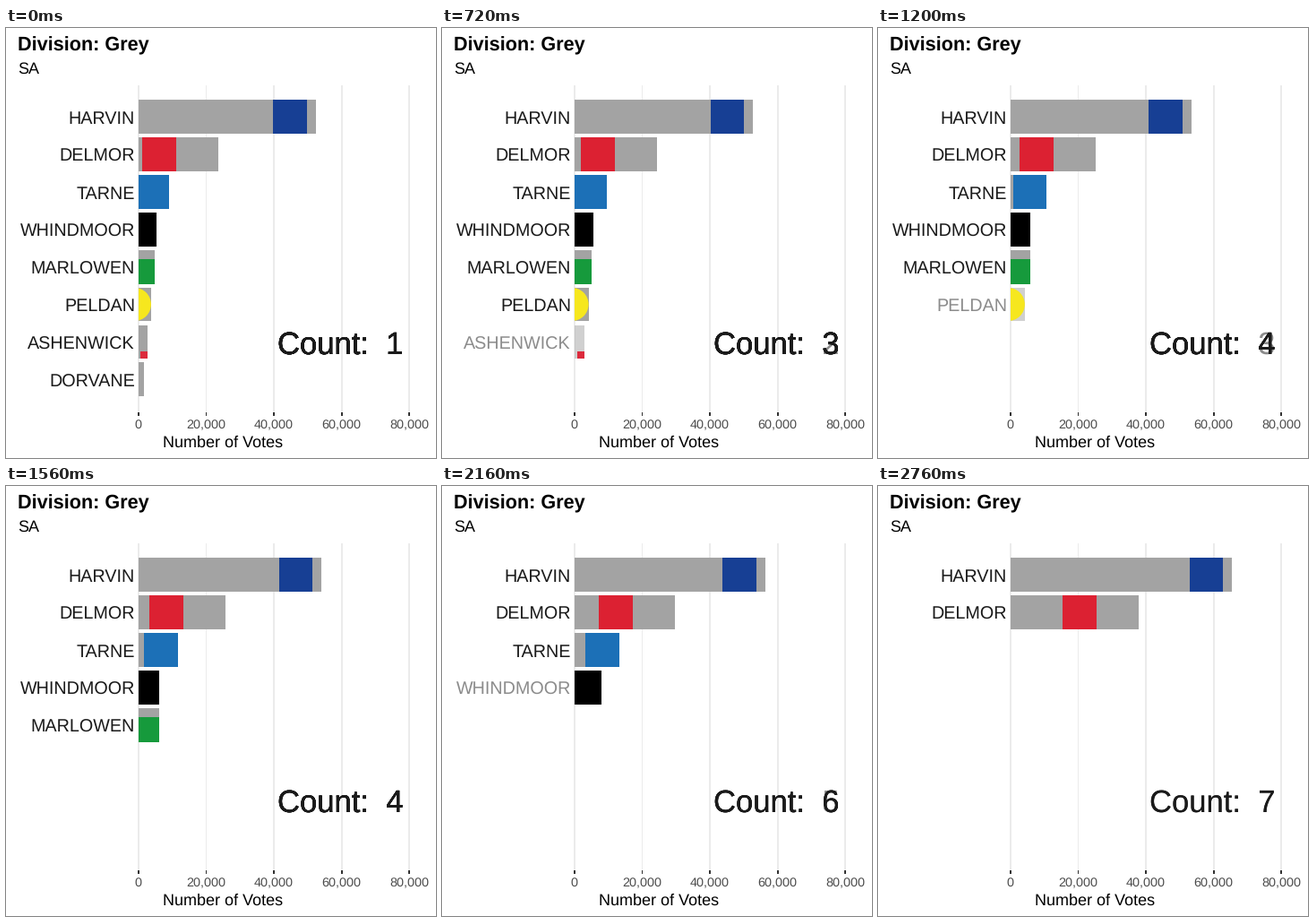
These frames come from a looping animation (480x480 px, 3 s). A matplotlib script:

```python
import matplotlib.pyplot as plt
from matplotlib.animation import FuncAnimation
from matplotlib.patches import Circle, Rectangle

plt.rcParams["font.family"] = "Liberation Sans"
plt.rcParams["text.hinting"] = "none"

SIZE, DPI = 480, 100
FRAMES, INTERVAL = 25, 120
X0, PX_PER_K = 147.8, 3.78          # zero line, pixels per thousand votes
TOP, BOTTOM = 64, 428.5             # panel edges
ROW0, ROW_STEP, BAR_H = 99, 41.9, 37.8
INK, BAR = "#1a1a1a", "#a3a3a3"

# Thousands of votes at each count, until the candidate drops out.
VOTES = {
    "HARVIN": [52.4, 52.5, 52.9, 54.0, 55.35, 57.3, 65.4],
    "DELMOR": [23.6, 23.9, 24.75, 25.65, 27.9, 31.4, 37.95],
    "TARNE": [9.05, 9.15, 9.9, 11.6, 12.5, 14.0],
    "WHINDMOOR": [5.35, 5.5, 5.65, 6.1, 7.9],
    "MARLOWEN": [4.75, 4.85, 5.55, 6.1],
    "PELDAN": [3.75, 4.1, 4.25],
    "ASHENWICK": [2.65, 2.85],
    "DORVANE": [1.65],
}

# Badge per candidate: shape, colour, size, offset of its centre from the bar end.
BADGES = {
    "HARVIN": ("square", "#173f94", 37.8, -28.5, 0),
    "DELMOR": ("square", "#dc2132", 37.8, -66, 0),
    "TARNE": ("square", "#1c70b7", 37.8, -18.9, 0),
    "WHINDMOOR": ("square", "#000000", 37.8, -18.9, 0),
    "MARLOWEN": ("square", "#169a3c", 28, -14, 4.9),
    "PELDAN": ("circle", "#f6e71e", 37, -18.5, 0),
    "ASHENWICK": ("square", "#dc2a3c", 8, -4, 14.5),
}

fig = plt.figure(figsize=(SIZE / DPI, SIZE / DPI), dpi=DPI, facecolor="white")
ax = fig.add_axes([0, 0, 1, 1])
ax.set_xlim(0, SIZE)
ax.set_ylim(SIZE, 0)
ax.axis("off")
panel = Rectangle((X0, TOP), SIZE - X0, BOTTOM - TOP, transform=ax.transData)


def label(x, y, text, px, color="black", **kw):
    return ax.text(x, y, text, fontsize=px * 72 / DPI, color=color,
                   va="baseline", **kw)


def block(x, y, w, h, color, **kw):
    return ax.add_patch(Rectangle((x, y), w, h, fc=color, lw=0, **kw))


def draw_scale():
    label(13, 25, "Division: Grey", 21.6, weight="bold")
    label(13, 51, "SA", 18)
    for k in range(0, 81, 20):
        x = X0 + k * PX_PER_K
        block(x - 0.9, TOP, 1.8, BOTTOM - TOP, "#ebebeb", zorder=0)
        block(x - 0.9, BOTTOM, 1.8, 4.5, "#333333", zorder=0)
        label(x, 447, f"{k * 1000:,}", 14.4, "#4d4d4d", ha="center")
    label(242, 468, "Number of Votes", 18, ha="center")


def draw_badge(name, end, y):
    shape, color, size, dx, dy = BADGES[name]
    cx, cy = end + dx, y + dy
    if shape == "circle":
        badge = ax.add_patch(Circle((cx, cy), size / 2, fc=color, lw=0, zorder=2))
    else:
        badge = block(cx - size / 2, cy - size / 2, size, size, color, zorder=2)
    badge.set_clip_path(panel)
    return badge


def draw_candidate(row, name, votes, alpha):
    y = ROW0 + row * ROW_STEP
    width = votes * PX_PER_K
    parts = [block(X0, y - BAR_H / 2, width, BAR_H, BAR, alpha=alpha, zorder=1),
             label(144, y + 8, name, 19.8, INK, ha="right", alpha=alpha)]
    if name in BADGES:
        parts.append(draw_badge(name, X0 + width, y))
    return parts


def draw_count(number, alpha=1):
    return label(303.3, 364, f"Count:  {number}", 34.6, INK, alpha=alpha)


artists = []


def update(i):
    while artists:
        artists.pop().remove()
    state = (i + 1) // 4
    halfway = i % 4 == 2
    target = state + halfway
    # Every candidate carries its own copy of the count label.
    if halfway:
        artists.append(draw_count(state + 1, 0.5))
    for row, (name, votes) in enumerate(VOTES.items()):
        if state >= len(votes):
            continue
        leaving = target >= len(votes)
        value = votes[state] if leaving else (votes[state] + votes[target]) / 2
        artists.extend(draw_candidate(row, name, value, 0.5 if leaving else 1))
        if not leaving:
            artists.append(draw_count(target + 1))
    return artists


draw_scale()
anim = FuncAnimation(fig, update, frames=FRAMES, interval=INTERVAL,
                     repeat=True, repeat_delay=0, blit=False)
plt.show()
```
